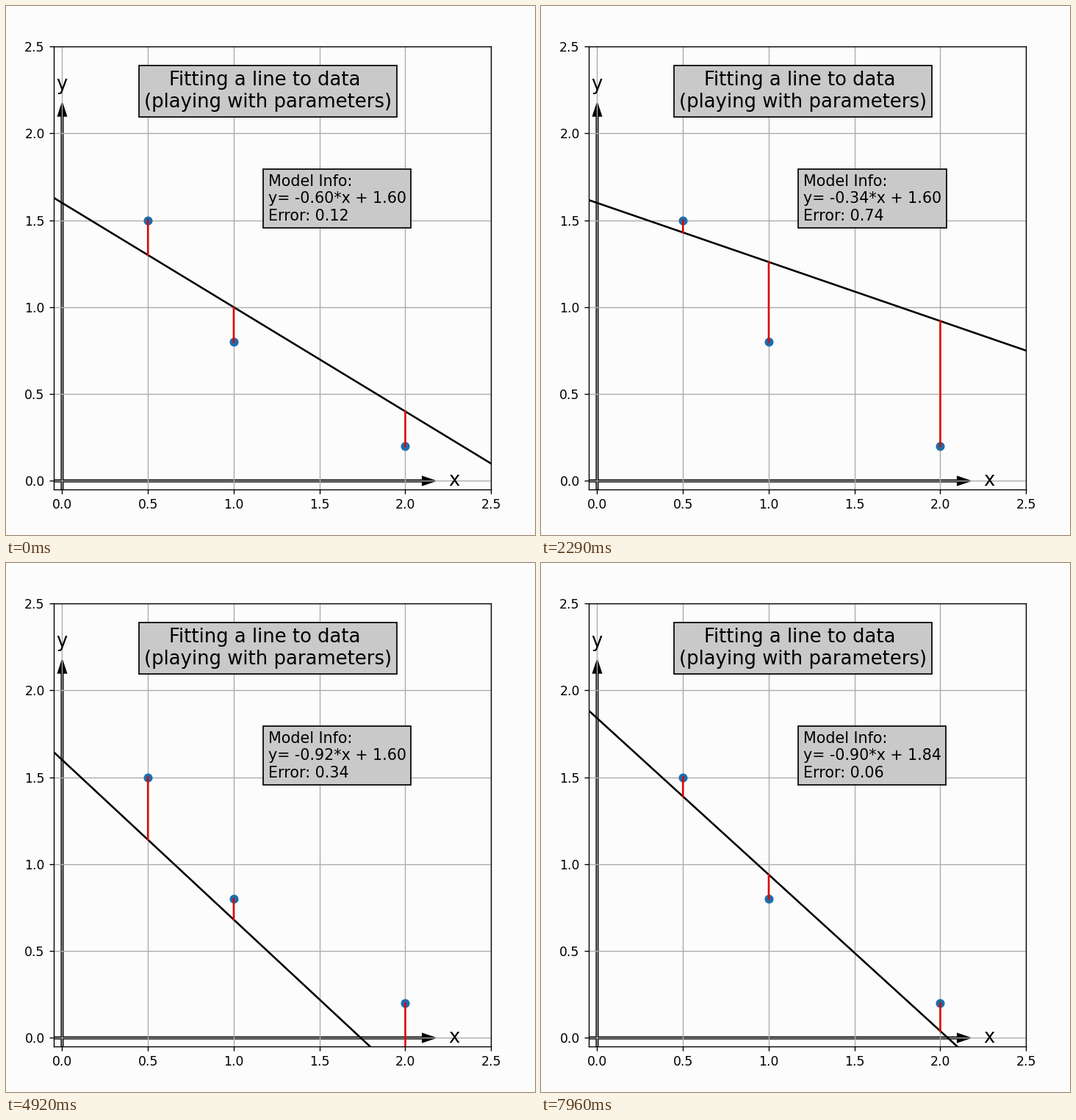
A matplotlib script that plays this animation: 720 by 720 pixels, repeating every 8 s.

```python
import numpy as np
import matplotlib.pyplot as plt
from matplotlib.animation import FuncAnimation

SIZE, DPI = 720, 124
FRAMES, INTERVAL = 200, 40
RATE = 24
BACK, PANEL = "#fcfcfc", "#c9c9c9"
LOW, HIGH = -0.05, 2.5

px = np.array([0.5, 1.0, 2.0])
py = np.array([1.5, 0.8, 0.2])


def ease_in(u):
    return u ** 1.5


def ease_out(u):
    return np.sin(u * np.pi / 2)


def ease_both(u):
    return (1 - np.cos(u * np.pi)) / 2


def move(t, start, end, change, ease):
    return change * ease(np.clip((t - start) / (end - start), 0, 1))


def slope(t):
    return (-0.6 + move(t, 0, 60.5, 0.3, ease_in)
            + move(t, 62, 146, -0.715, ease_out)
            + move(t, 146, 174, 0.115, ease_both))


def offset(t):
    return 1.6 + move(t, 176, 192, 0.264, ease_in)


fig = plt.figure(figsize=(SIZE / DPI, SIZE / DPI), dpi=DPI, facecolor=BACK)
ax = fig.add_axes([64.8 / SIZE, 61.8 / SIZE, 595.4 / SIZE, 603 / SIZE],
                  facecolor=BACK)
ax.set_xlim(LOW, HIGH)
ax.set_ylim(LOW, HIGH)
ticks = np.arange(0, 2.6, 0.5)
ax.set_xticks(ticks)
ax.set_yticks(ticks)
ax.grid(True, color="#acacac")

# The grid lies above these arrows and splits their shafts
for dx, dy in ((2.15, 0), (0, 2.15)):
    ax.arrow(LOW if dx else 0, LOW if dy else 0, dx, dy, width=0.01,
             head_width=0.05, head_length=0.075, color="black")
ax.text(2.25, -0.03, "x", fontsize=15)
ax.text(-0.035, 2.25, "y", fontsize=15)

box = dict(facecolor=PANEL, edgecolor="black")
ax.text(1.2, 2.15, "Fitting a line to data \n(playing with parameters)",
        fontsize=15, ha="center", bbox=box)
info = ax.text(1.2, 1.5, "", fontsize=12, bbox=box)

ax.plot(px, py, "o", color="#1c6dab", snap=False)
xs = np.array([-0.1, 2.6])
line, = ax.plot(xs, xs, color="black")
bars = [ax.plot([x, x], [y, y], color="#e00505", snap=False)[0]
        for x, y in zip(px, py)]


def update(i):
    t = round(i * INTERVAL * RATE / 1000)
    a, b = slope(t), offset(t)
    fit = a * px + b
    line.set_ydata(a * xs + b)
    for bar, y, f in zip(bars, py, fit):
        bar.set_ydata([y, f])
    error = np.sum((fit - py) ** 2)
    info.set_text(f"Model Info:\ny= {a:.2f}*x + {b:.2f}\nError: {error:.2f}")
    return [line, info, *bars]


anim = FuncAnimation(fig, update, frames=FRAMES, interval=INTERVAL,
                     repeat=True, repeat_delay=0, blit=False)
plt.show()
```
